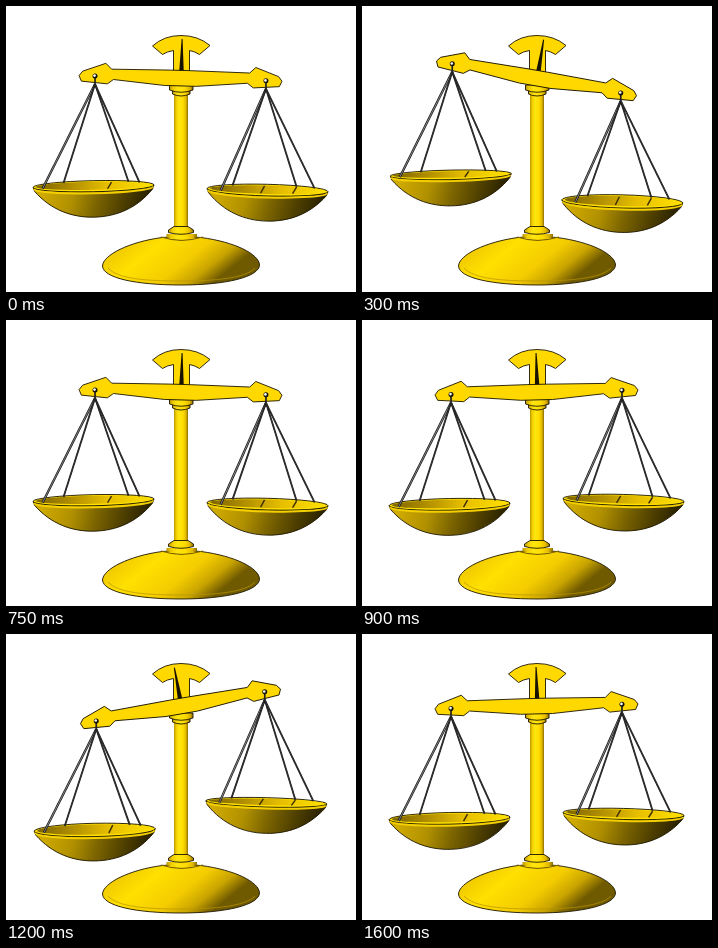
An HTML page for the animation above (1.7 s loop, 350 by 286 pixels).

```html
<!DOCTYPE html>
<html lang="en">
<head>
<meta charset="utf-8">
<title>Balance scales</title>
<style>
html, body { margin: 0; width: 100%; height: 100%; overflow: hidden; background: #fff; }
svg { display: block; width: 100vw; height: 100vh; }
.edge { stroke: #1c1600; stroke-width: .9; stroke-linejoin: round; }
</style>
</head>
<body>
<svg viewBox="0 0 350 286" xmlns="http://www.w3.org/2000/svg">
  <defs>
    <linearGradient id="post">
      <stop offset="0" stop-color="#b89500"/><stop offset=".15" stop-color="#f0cc00"/>
      <stop offset=".35" stop-color="#ffe610"/><stop offset=".65" stop-color="#ffdc00"/>
      <stop offset=".85" stop-color="#e2b900"/><stop offset="1" stop-color="#8a6c00"/>
    </linearGradient>
    <linearGradient id="dome" gradientUnits="userSpaceOnUse" x1="135" y1="226" x2="188" y2="292">
      <stop offset="0" stop-color="#f2cc00"/><stop offset=".25" stop-color="#ffe000"/>
      <stop offset=".6" stop-color="#f4cc00"/><stop offset=".82" stop-color="#c9a400"/>
      <stop offset="1" stop-color="#705a00"/>
    </linearGradient>
    <linearGradient id="bowl" gradientUnits="userSpaceOnUse" x1="-50" y1="0" x2="48" y2="26">
      <stop offset="0" stop-color="#cfaa00"/><stop offset=".3" stop-color="#b09000"/>
      <stop offset=".55" stop-color="#7a6300"/><stop offset=".8" stop-color="#4e3f00"/>
      <stop offset="1" stop-color="#2e2500"/>
    </linearGradient>
    <linearGradient id="inside">
      <stop offset="0" stop-color="#7d6400"/><stop offset=".3" stop-color="#b08e00"/>
      <stop offset=".62" stop-color="#e6be00"/><stop offset="1" stop-color="#ffe000"/>
    </linearGradient>
  </defs>

  <path class="edge" fill="url(#dome)" d="M96.500 260C97 249 123 236 156 231.500Q175 229 195 231.500C229 236 253 248 253.500 259C253 271 220 279 175 279S97 272 96.500 260Z"/>
  <path fill="none" stroke="#b89400" stroke-width="1" opacity=".7" d="M102 262C112 273 140 275 175 275S240 272 249 262"/>
  <path fill="none" stroke="#7d6300" stroke-width="1.300" d="M155 231Q175 237.500 197 231"/>
  <path fill="url(#post)" d="M160.500 228H191V231Q176 236.500 160.500 231Z"/>
  <rect x="168" y="84" width="14" height="140" fill="url(#post)"/>
  <path class="edge" fill="url(#post)" d="M168 220.500H182L187.500 224V226.500Q175 230 162.500 226.500V224Z"/>
  <path class="edge" fill="url(#post)" d="M166.500 84H184V88Q175 92 166.500 88Z"/>
  <path class="edge" fill="url(#post)" d="M163.500 79H187V84Q175 88.500 163.500 84Z"/>

  <path class="edge" fill="#ffd800" d="M146.500 40Q158 29.500 175 29.500T204 39.500L193.500 48.500Q189 45.500 183.500 44.500V70H167.500V44.500Q161 45.500 156.500 48.500Z"/>
  <path id="needle" fill="#171200" d="M-.5-39H.5L2.600-6H-2Z"/>
  <path id="beam" class="edge" fill="#ffd800"/>
  <g id="pans"></g>
</svg>
<script>
const LOOP = 1700, ARM = 85.5, CX = 174.5, CY = 72.4, RX = 60.5;
// start time, beam tilt in degrees
const POSES = [
  [0, 1.6], [150, 6.4], [300, 9.8], [600, 6.4], [750, 1.6],
  [900, -1.4], [1050, -6.4], [1200, -9.8], [1500, -6.4], [1600, -1.4]
];
const SIDES = [
  { dir: -1, shift: -1.5, drop: 110, lean: -1.2, cords: [-51, -30, 35, 46], marks: [17] },
  { dir: 1, shift: 1.6, drop: 109.5, lean: 1.5, cords: [-47, -35, 29, 47], marks: [-4, 28] }
];

const $ = id => document.getElementById(id);
const line = (x1, y1, x2, y2, color, w) =>
  `<path d="M${x1} ${y1}L${x2} ${y2}" stroke="${color}" stroke-width="${w}"/>`;

const arm = [[10, -8], [69, -7.3], [75, -13], [98, -4.5], [101.5, 0], [99, 5.5], [73, 7.5], [67, 3], [16, 7.5]];
const mirrored = arm.map(([x, y]) => [-x, y]).reverse();
$("beam").setAttribute("d", "M" + arm.concat(mirrored).join("L") + "Z");

function cord(px, py, x, y, front) {
  return line(px, py, x, y, "#151515", front ? 2.3 : 1.8) +
    line(px, py, x, y, front ? "#a0a0a0" : "#505050", front ? 0.8 : 0.5);
}

function pan(side, tilt) {
  const a = tilt * Math.PI / 180;
  const px = CX + side.dir * ARM * Math.cos(a);
  const py = CY + side.dir * ARM * Math.sin(a);
  const cx = px + side.shift;
  const cy = py + side.drop - 0.07 * (py - CY);
  const ry = 4.7 + (cy - 168) * 0.07;
  const slope = Math.tan(side.lean * Math.PI / 180);
  const rim = (x, sign) => cy + x * slope + sign * ry * Math.sqrt(1 - (x / RX) ** 2);

  let out = `<g transform="translate(${cx} ${cy}) rotate(${side.lean})">
    <path class="edge" fill="url(#bowl)" d="M${-RX} 0L-59 4C-43 23 -22 31 0 31S43 23 59 4L${RX} 0Z"/>
    <ellipse class="edge" rx="${RX}" ry="${ry}" fill="#ffe000"/>
    <ellipse rx="57.500" ry="${ry - 1.6}" cy="-.4" fill="url(#inside)"/>
    <path d="M-59.500 1.500A59.500 ${ry} 0 0 0 59.500 1.500" fill="none" stroke="#f4d000" stroke-width="2"/>
  </g>`;
  const top = py + 8;
  side.cords.forEach((x, i) => {
    const front = i === 0;
    out += cord(px, top, cx + x, rim(x, front ? 0.5 : -0.8), front);
  });
  for (const x of side.marks) {
    out += line(cx + x + 1, rim(x, -0.7), cx + x - 3, rim(x, 0.55), "#3a2b00", 1.4);
  }
  out += line(px, py, px, top + 1, "#222", 1.7);
  out += `<circle cx="${px}" cy="${py}" r="2.500" fill="#151200"/>
    <circle cx="${px - 0.5}" cy="${py - 0.4}" r="1.300" fill="#fff"/>`;
  return out;
}

let shown;
function draw(now) {
  const t = now % LOOP;
  const pose = POSES.filter(p => p[0] <= t).pop();
  if (pose === shown) return;
  shown = pose;
  const tilt = pose[1];
  $("beam").setAttribute("transform", `translate(${CX} ${CY}) rotate(${tilt})`);
  $("needle").setAttribute("transform", `translate(175 72) rotate(${tilt})`);
  $("pans").innerHTML = SIDES.map(s => pan(s, tilt)).join("");
}

const start = performance.now();
function tick() {
  draw(performance.now() - start);
  requestAnimationFrame(tick);
}
tick();
</script>
</body>
</html>
```
